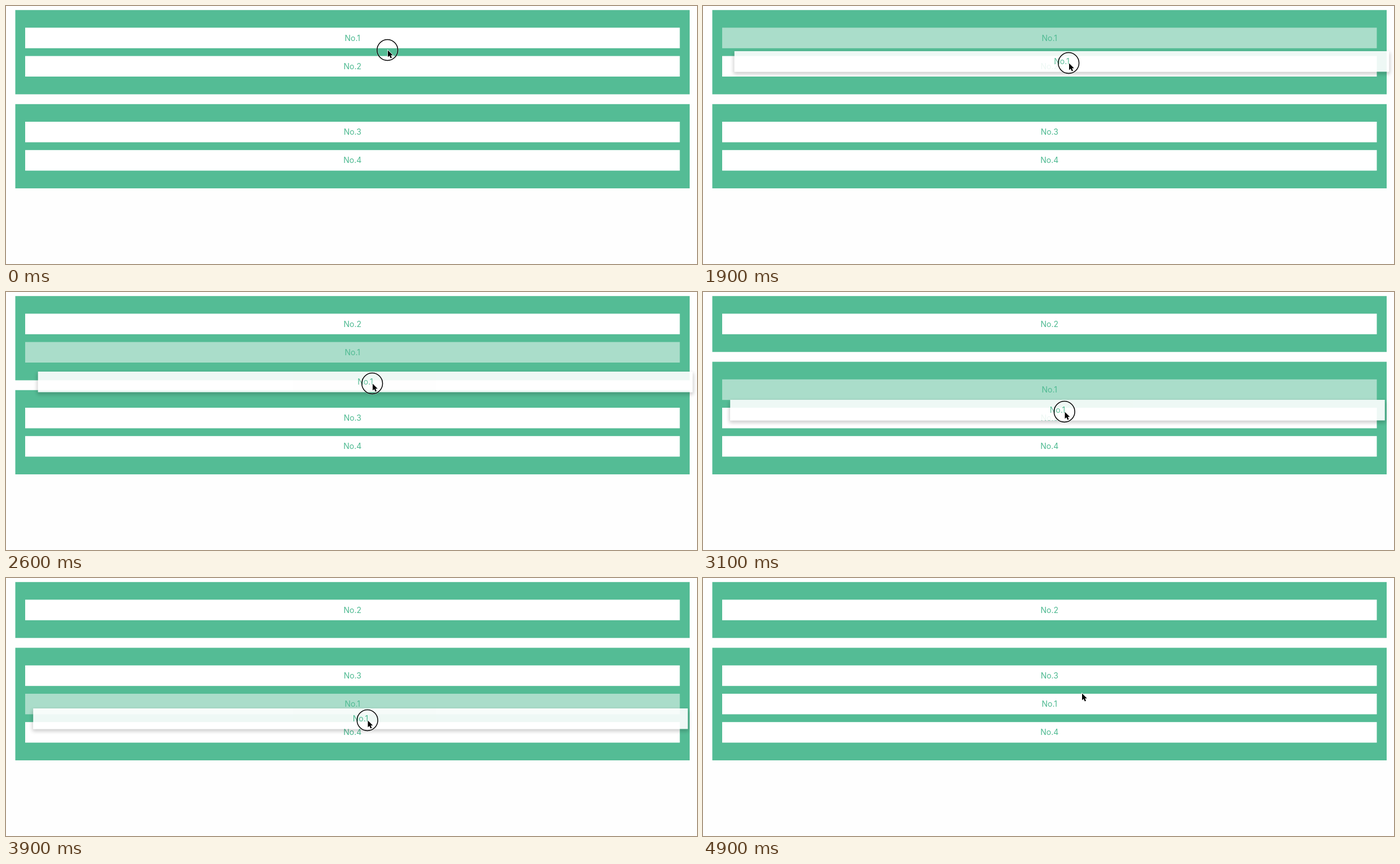
Animation of 1225x457 px, one loop 5 s. Source, as an HTML page:

```html
<!DOCTYPE html>
<html lang="en">
<head>
<meta charset="utf-8">
<title>Drag between lists</title>
<style>
  html, body { margin: 0; width: 100%; height: 100%; overflow: hidden; background: #fefefe; }
  svg { display: block; width: 1225px; height: 457px; }
  text { font: 14px Inter, "Liberation Sans", sans-serif; text-anchor: middle; fill: #4cb990; }
  .list { fill: #54bc95; }
  .card { fill: #fff; }
</style>
</head>
<body>
<svg viewBox="0 0 1225 457">
  <defs>
    <filter id="soft" filterUnits="userSpaceOnUse" x="-20" y="-20" width="1201" height="80">
      <feGaussianBlur stdDeviation="3"/>
    </filter>
    <clipPath id="outside">
      <path clip-rule="evenodd" d="M-20-20H1181V60H-20ZM0 0V36.4H1160.5V0Z"/>
    </clipPath>
  </defs>
  <g id="lists"></g>
  <g id="cards"></g>
  <g id="ghost">
    <g clip-path="url(#outside)">
      <rect x="-2" y="2" width="1164.5" height="39" rx="4" opacity=".18" filter="url(#soft)"/>
    </g>
    <g id="lifted" opacity=".9"></g>
  </g>
  <g id="pointer">
    <g id="ring" fill="none">
      <circle cx="-.8" r="18.4" stroke="#fff" stroke-width="2.6" opacity=".4"/>
      <circle cx="-.8" r="18.4" stroke="#000" stroke-width="1.5"/>
    </g>
    <path d="M0 .5v12l2.8-2.5 2 4.5 2.2-.9-1.9-4.4h3.7z" stroke="#fff" stroke-width="1.4" paint-order="stroke"/>
  </g>
</svg>
<script>
const LOOP = 5000, STEP = 100;
const LEFT = 34, TOP = 7.2, PITCH = 50.2, GAP = 17.4;
const GRAB = { x: 593.3, y: 21 };
const RELEASE = 300, LIFT = 1600, DROP = 4700;
const HOPS = [2000, 2700, 3500];   // times at which card 1 passes a neighbour

// pointer stops; it moves evenly from one to the next
const STOPS = [
  { t: 200, x: 677, y: 78 },
  { t: 600, x: 687, y: 127 },
  { t: 700, x: 687, y: 127 },
  { t: 1300, x: 628, y: 58 },
  { t: 1500, x: 628, y: 58 },
  { t: 1900, x: 649, y: 101 },
  { t: 2600, x: 650, y: 162 },
  { t: 3100, x: 641.5, y: 212 },
  { t: 3900, x: 641.5, y: 252 },
  { t: 4600, x: 641, y: 262 },
  { t: 4900, x: 672, y: 204 }
];

const $ = id => document.getElementById(id);

function make(tag, parent, attrs, text) {
  const el = document.createElementNS("http://www.w3.org/2000/svg", tag);
  for (const k in attrs) el.setAttribute(k, attrs[k]);
  if (text) el.textContent = text;
  return parent.appendChild(el);
}

function fillCard(parent, n) {
  make("rect", parent, { class: "card", width: 1160.5, height: 36.4 });
  make("text", parent, { x: 580.3, y: 23.3 }, "No." + n);
  return parent;
}

const place = (el, x, y) => el.setAttribute("transform", `translate(${x} ${y})`);
const show = (el, on) => el.setAttribute("visibility", on ? "visible" : "hidden");
const mix = (a, b, u) => a + (b - a) * u;

const lists = [0, 1].map(() => make("rect", $("lists"), { class: "list", x: 16.5, width: 1195.5 }));
const cards = [1, 2, 3, 4].map(n => fillCard(make("g", $("cards")), n));
fillCard($("lifted"), 1);

function pointerAt(t) {
  const i = STOPS.findIndex(s => s.t >= t);
  const b = STOPS[i], a = STOPS[Math.max(0, i - 1)];
  const u = a === b ? 1 : (t - a.t) / (b.t - a.t);
  return { x: mix(a.x, b.x, u), y: mix(a.y, b.y, u) };
}

// Card 1 hops through the row "2 | 3 4"; the bar parts the two lists.
function layout(t) {
  const row = [..."2|34"];
  row.splice(HOPS.filter(h => h <= t).length, 0, "1");
  let y = TOP;
  row.join("").split("|").forEach((names, i) => {
    const height = 48.8 + PITCH * names.length;
    lists[i].setAttribute("y", y);
    lists[i].setAttribute("height", height);
    [...names].forEach((n, k) => place(cards[n - 1], LEFT, y + 31.2 + PITCH * k));
    y += height + GAP;
  });
}

function render(time) {
  const t = Math.floor((time % LOOP) / STEP) * STEP;
  const dragging = t >= LIFT && t < DROP;
  const { x, y } = pointerAt(t);
  layout(t);
  cards[0].setAttribute("opacity", dragging ? 0.5 : 1);
  show($("ghost"), dragging);
  place($("ghost"), x - GRAB.x, y - GRAB.y);
  show($("ring"), dragging || t < RELEASE);
  place($("pointer"), x, y);
}

const start = performance.now();
function tick() {
  render(performance.now() - start);
  requestAnimationFrame(tick);
}
tick();
</script>
</body>
</html>
```
